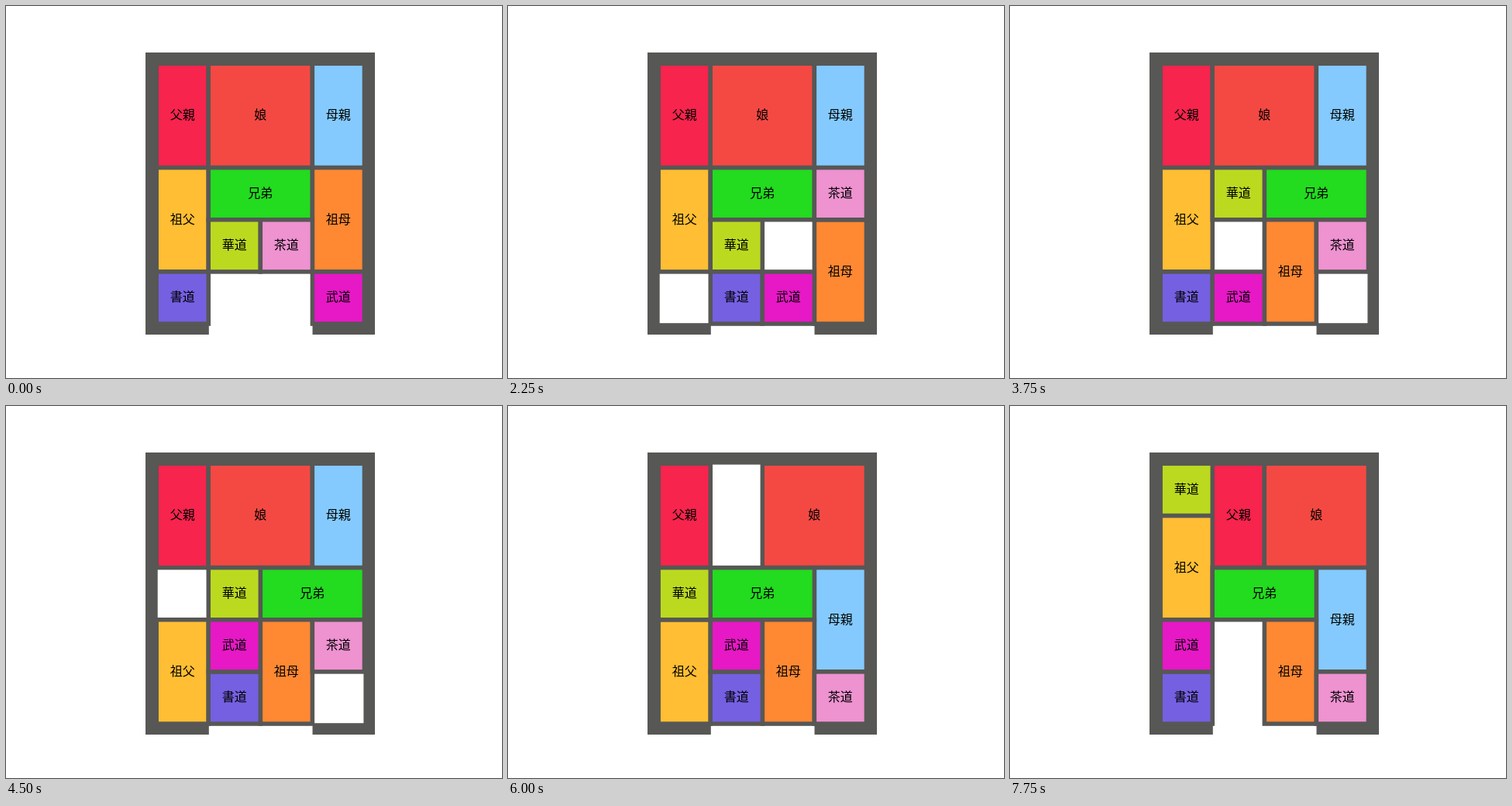
An HTML page for the animation above (8000 ms loop, 640 by 480 pixels).

```html
<!DOCTYPE html>
<html lang="ja">
<head>
<meta charset="utf-8">
<title>箱入り娘</title>
<style>
  html, body { margin: 0; width: 100%; height: 100%; overflow: hidden; background: #fff; }
  svg { display: block; width: 640px; height: 480px; }
  rect { stroke: #575755; stroke-width: 5.5; }
  .wall { fill: #575755; stroke: none; }
  .space { fill: #fff; stroke: none; }
  text { font: 16px "Noto Sans CJK JP", "Noto Sans CJK", sans-serif; text-anchor: middle; fill: #000; }
</style>
</head>
<body>
<svg viewBox="0 0 640 480">
  <rect class="wall" x="180" y="60" width="296" height="364"/>
  <rect class="space" x="195.7" y="75.6" width="265.7" height="333.6"/>
  <rect class="space" x="261.8" y="409" width="133.7" height="16"/>
  <g id="board"></g>
</svg>
<script>
  const STEP = 250, PITCH_X = 67.05, PITCH_Y = 67.15, LEFT = 194.2, TOP = 74.3;

  // label, colour, column, row, width, height
  const pieces = {
    F: ['父親', '#f7244d', 0, 0, 1, 2],
    D: ['娘', '#f44943', 1, 0, 2, 2],
    M: ['母親', '#84caff', 3, 0, 1, 2],
    G: ['祖父', '#ffbe33', 0, 2, 1, 2],
    B: ['兄弟', '#23db1f', 1, 2, 2, 1],
    H: ['祖母', '#ff8833', 3, 2, 1, 2],
    K: ['華道', '#bbda1f', 1, 3, 1, 1],
    T: ['茶道', '#ee92d0', 2, 3, 1, 1],
    S: ['書道', '#7560e2', 0, 4, 1, 1],
    U: ['武道', '#e718c5', 3, 4, 1, 1]
  };

  // piece and direction (left, right, up, down)
  const moves = ('Sr Gd Bl Tu Ul Hd Tr Br Gu Sl Ul Hl Td Br Ku Uu Sr Gd ' +
    'Kl Bl Md Td Md Dr Fr Ku Gu Ku Gu Ul Sl').split(' ');
  const dirs = { l: [-1, 0], r: [1, 0], u: [0, -1], d: [0, 1] };

  const board = document.getElementById('board');

  function add(parent, tag, attrs) {
    const el = document.createElementNS('http://www.w3.org/2000/svg', tag);
    for (const key in attrs) el.setAttribute(key, attrs[key]);
    return parent.appendChild(el);
  }

  const groups = {};
  for (const id in pieces) {
    const [label, fill, , , cols, rows] = pieces[id];
    const width = cols * PITCH_X, height = rows * PITCH_Y;
    groups[id] = add(board, 'g', {});
    add(groups[id], 'rect', { width, height, fill });
    add(groups[id], 'text', { x: width / 2, y: height / 2 + 5 }).textContent = label;
  }

  function layout(step) {
    const at = {};
    for (const id in pieces) at[id] = pieces[id].slice(2, 4);
    for (const [id, dir] of moves.slice(0, step)) {
      at[id][0] += dirs[dir][0];
      at[id][1] += dirs[dir][1];
    }
    for (const id in at) {
      const x = LEFT + at[id][0] * PITCH_X, y = TOP + at[id][1] * PITCH_Y;
      groups[id].setAttribute('transform', `translate(${x} ${y})`);
    }
  }

  let shown = -1;
  function tick() {
    const step = Math.floor(performance.now() / STEP) % (moves.length + 1);
    if (step !== shown) layout(shown = step);
    requestAnimationFrame(tick);
  }
  tick();
</script>
</body>
</html>
```
